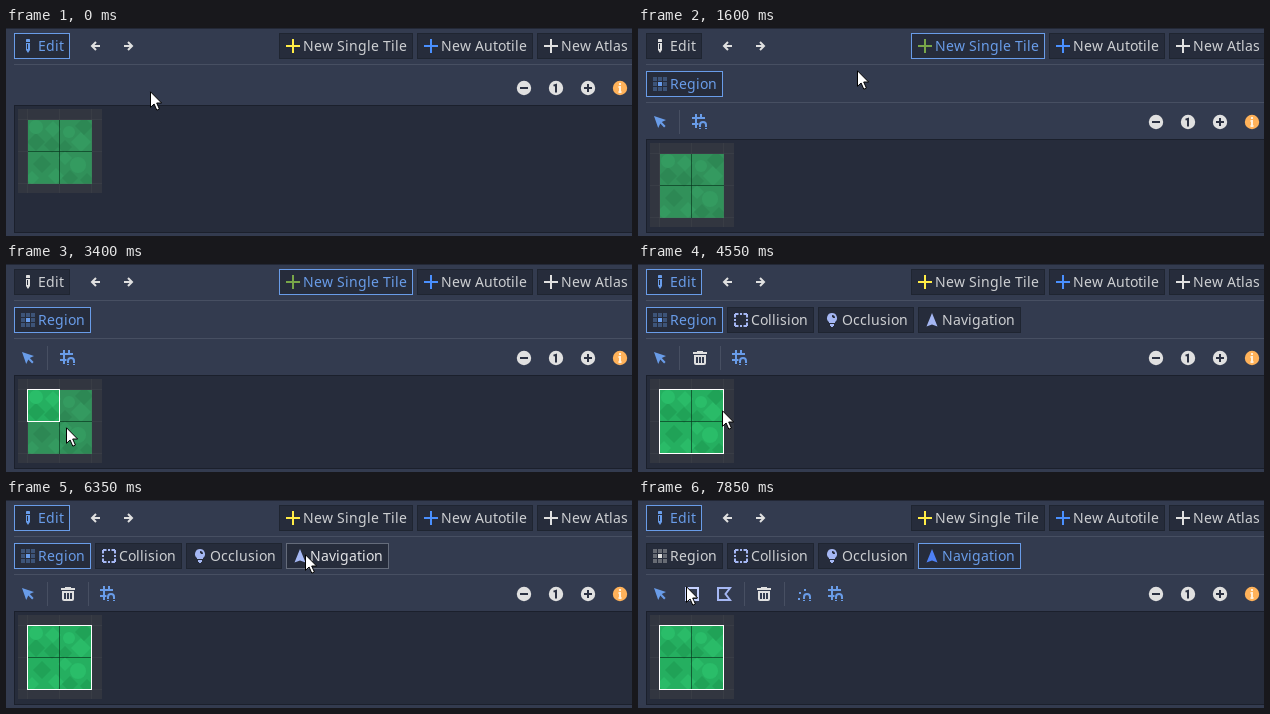
These frames come from a looping animation (626 px wide and 208 px high, 8 s). An HTML page:

```html
<!DOCTYPE html>
<html lang="en">
<head>
<meta charset="utf-8">
<title>Tile set editor</title>
<style>
  html, body { margin: 0; width: 100%; height: 100%; overflow: hidden; background: #333b4f; }
  svg { display: block; width: 626px; height: 208px; }
  text { font: 14px "Noto Sans", sans-serif; fill: #cdcfd2; white-space: pre; }
  .button .box { fill: #262c3b; stroke: #1f2531; }
  .button .icon { fill: var(--tint); stroke: var(--tint); }
  .button.hover .box { stroke: #656c7b; }
  .button.hover text { fill: #e2e3e6; }
  .button.pressed .box { stroke: #699ce8; }
  .button.pressed text { fill: #699ce8; }
  .button.pressed .icon { fill: var(--lit); stroke: var(--lit); }
  .solid { stroke: none; }
  .line { fill: none; stroke-width: 2; }
  .separator { stroke: #474f62; }
  .light { fill: #e0e0e0; }
  .blue { fill: #699ce8; }
</style>
</head>
<body>
<svg id="stage" viewBox="0 0 626 208"></svg>
<script>
const LOOP = 8000, STEP = 50;
const WHITE = '#e0e0e0', ACCENT = '#699deb', LILAC = '#a5b7f3', LILAC_LIT = '#4e80f5';

const solid = (d, extra = '') => `<path class="solid" fill-rule="evenodd" d="${d}" ${extra}/>`;
const line = (d, extra = '') => `<path class="line" d="${d}" ${extra}/>`;
const at = (x, y, body, attrs = '') => `<g transform="translate(${x} ${y})" ${attrs}>${body}</g>`;

const cells = [0, 1, 2, 3, 4, 5, 6, 7, 8].map(i =>
  `<rect class="solid" x="${1 + i % 3 * 5}" y="${1 + Math.floor(i / 3) * 5}" width="4" height="4" opacity="${i === 4 ? 1 : .35}"/>`).join('');
const magnet = solid('M11 7a4 4 0 0 0-4 4v2h2v-2a2 2 0 0 1 4 0v2h2v-2a4 4 0 0 0-4-4z')
  + solid('M7 14h2v1h-2zM13 14h2v1h-2z');

// Icons on a 16 px square
const icons = {
  pencil: solid('M7 1c-.6 0-1 .4-1 1v2h4V2c0-.6-.4-1-1-1zM6 5v7l2 3 2-3V5zM7 6h1v5H7z'),
  plus: solid('M7 1v6H1v2h6v6h2V9h6V7H9V1z'),
  region: cells,
  collision: line('M2 2H14V14H2z', 'stroke-dasharray="3.5 1.5 2 1.5 3.5 0"'),
  occlusion: solid('M8 1a5 5 0 0 0-3 9v1h6v-1a5 5 0 0 0-3-9zM8 3a3 3 0 0 1 3 3h-2a1 1 0 0 0-1-1zM6 12h4v2H9v1H7v-1H6z'),
  navigation: solid('M8 1L2.5 14.5 8 12.5l5.5 2z'),
  select: solid('M1 2l4.2 12 2.1-4.4 3.8 3.8 1.5-1.5-3.8-3.8L13 6z'),
  trash: solid('M5 1v1H1v2h14V2h-4V1zM2 5v8a2 2 0 0 0 2 2h8a2 2 0 0 0 2-2V5zM4 7h2v6H4zM7 7h2v6H7zM10 7h2v6h-2z'),
  grid: solid('M3 0v3H0v2h3v4H0v2h3v3h2V5h8V3h-3V0H8v3H5V0zM5 9h1.5v2H5z') + magnet,
  dots: solid('M2 12h2v2H2zM3 6h2v2H3zM8 3h2v2H8z') + magnet,
  rectangle: line('M2 2H14V14H2z'),
  polygon: line('M2 2H14L9.5 8 14 14H2z')
};

// Integer glyph advances, as in hinted UI text
const pen = document.createElement('canvas').getContext('2d');
pen.font = '14px "Noto Sans", sans-serif';
const advances = text => [...text].map(c => Math.round(pen.measureText(c).width));
function label(x, y, text) {
  let cursor = x;
  const xs = advances(text).map(w => (cursor += w) - w);
  return `<text x="${xs.join(' ')}" y="${y}">${text}</text>`;
}

const areas = {};
function button(id, x, y, text, icon, tint, lit) {
  const width = advances(text).reduce((a, b) => a + b) + 30;
  areas[id] = { x, y, width, height: 26 };
  return `<g id="${id}" class="button" style="--tint:${tint};--lit:${lit}">
    <rect class="box" x="${x + .5}" y="${y + .5}" width="${width - 1}" height="25"/>
    ${at(x + 6, y + 5, icons[icon], 'class="icon"')}${label(x + 24, y + 18, text)}</g>`;
}
function row(x, y, specs) {
  return specs.map(([id, ...rest]) => {
    const markup = button(id, x, y, ...rest);
    x += areas[id].width + 4;
    return markup;
  }).join('');
}

const tool = (center, icon, cls, attrs = '') => at(center - 8, 52, icons[icon], `class="${cls}" ${attrs}`);
const divider = x => `<path class="separator" d="M${x}.5 48V72"/>`;
const hline = y => `<path class="separator" d="M8 ${y}.5H626"/>`;

const disc = (x, body, color = WHITE) =>
  at(x, 60, `<circle r="7.2" fill="${color}"/><path fill="none" stroke-width="2" ${body}/>`);
const zoom = disc(518, 'stroke="#2b3142" d="M-4 0H4"')
  + disc(550, 'stroke="#2b3142" d="M-2.5 -2.4L0 -3.2V4.5"')
  + disc(582, 'stroke="#2b3142" d="M-4 0H4M0 -4V4"')
  + disc(614, 'stroke="#fff0dc" d="M0 -5V-3M-1.5 -1H0V4M-1.5 4H1.5"', '#ffb25a');

const diamond = (x, y, r, fill) => `<path fill="${fill}" d="M${x} ${y - r}l${r} ${r}-${r} ${r}-${r}-${r}z"/>`;
const blob = (x, y, r) => `<circle cx="${x}" cy="${y}" r="${r}" fill="#2abd69"/>`;
const leaf = '#2abb68', shade = '#20a257';
const tiles = `<svg x="22" y="92" width="64" height="64">
  <rect width="64" height="64" fill="#25af60"/>
  ${diamond(8, 22, 9, shade)}${diamond(25, 9, 8, leaf)}${diamond(24, 25, 8, shade)}${blob(8, 7, 7)}
  ${diamond(53, 22, 10, leaf)}${diamond(56, 6, 9, shade)}${diamond(37, 27, 7, shade)}${blob(41, 12, 6)}
  ${diamond(14, 44, 9, shade)}${diamond(28, 56, 8, leaf)}${diamond(4, 58, 7, leaf)}
  ${diamond(37, 38, 7, leaf)}${diamond(42, 58, 8, shade)}${diamond(59, 60, 7, shade)}${blob(50, 45, 8)}
</svg>`;

document.getElementById('stage').innerHTML = `
  <rect width="626" height="208" fill="#333b4f"/>
  <rect width="626" height="1" fill="#232836"/>
  ${row(8, 5, [['edit', 'Edit', 'pencil', WHITE, ACCENT]])}
  <g fill="none" stroke="${WHITE}" stroke-width="2">
    <path d="M94 18H86M90 14l-4 4 4 4"/><path d="M118 18h8M122 14l4 4-4 4"/>
  </g>
  ${row(273, 5, [
    ['single', 'New Single Tile', 'plus', '#ffec46', '#78a649'],
    ['autotile', 'New Autotile', 'plus', '#4a90ff', '#4a90ff'],
    ['atlas', 'New Atlas', 'plus', WHITE, ACCENT]])}
  ${hline(36)}
  <g id="tabs">
    ${row(8, 43, [['region', 'Region', 'region', WHITE, ACCENT]])}
    <g id="shapeTabs">${row(areas.region.x + areas.region.width + 4, 43, [
      ['collision', 'Collision', 'collision', LILAC, LILAC_LIT],
      ['occlusion', 'Occlusion', 'occlusion', LILAC, LILAC_LIT],
      ['navigation', 'Navigation', 'navigation', LILAC, LILAC_LIT]])}</g>
    ${hline(74)}
  </g>
  <rect id="panel" x="8.5" width="630" fill="#262c3b" stroke="#1b202c"/>
  <g id="lower">
    ${zoom}
    <g id="tools">
      ${tool(23, 'select', 'blue', 'id="select"')}
      <g id="drawTools">${divider(41)}${tool(62, 'grid', 'blue')}</g>
      <g id="regionTools">${divider(41)}${tool(62, 'trash', 'light')}${divider(82)}${tool(102, 'grid', 'blue')}</g>
      <g id="shapeTools">
        ${tool(54, 'rectangle', '', `id="rectangle" stroke="${LILAC}"`)}
        ${tool(86, 'polygon', '', `stroke="${LILAC}"`)}
        ${divider(106)}${tool(126, 'trash', 'light')}${divider(146)}
        ${tool(166, 'dots', 'blue')}${tool(198, 'grid', 'blue')}
      </g>
    </g>
    ${tiles}
    <path id="dim" fill="#4c4c4c" fill-opacity=".3" fill-rule="evenodd"/>
    <path stroke="#59605f" stroke-opacity=".18" d="M21.5 81V165M53.5 81V92M53.5 156V165M85.5 81V165M12 91.5H96M12 123.5H22M86 123.5H96M12 155.5H96"/>
    <path stroke="#06331c" stroke-opacity=".65" d="M53.5 92V156M22 123.5H86"/>
    <rect id="selection" x="21.5" y="91.5" fill="none" stroke="#fff"/>
  </g>
  <path id="pointer" fill="#fff" stroke="#000" d="M.5 .8V16.3L4.1 13 6.8 19.2 9.4 18 6.7 12H11.6z"/>`;

// time, x, y, eased
const path = [
  [250, 144, 63], [800, 289, 19, 1],
  [1300, 289, 19], [2150, 45, 100, 1], [2300, 28, 97], [2400, 20, 93],
  [2600, 20, 93], [2950, 26, 126, 1],
  [3200, 26, 126], [3400, 60, 163], [3600, 74, 175],
  [4250, 74, 175], [4400, 67, 163], [4550, 84, 146],
  [4700, 84, 146], [4750, 85, 144],
  [4900, 85, 144], [5750, 118, 52, 1],
  [5950, 118, 52], [6350, 299, 54, 1],
  [6900, 299, 54], [7350, 47, 132, 1],
  [7450, 47, 132], [7600, 30, 102], [7700, 35, 94],
  [7800, 35, 94], [7850, 48, 86]
];
function pointerAt(t) {
  const next = path.findIndex(p => p[0] > t);
  if (next <= 0) return (next ? path[path.length - 1] : path[0]).slice(1, 3);
  const [t0, x0, y0] = path[next - 1], [t1, x1, y1, eased] = path[next];
  let k = (t - t0) / (t1 - t0);
  if (eased) k = k * k * (3 - 2 * k);
  return [Math.round(x0 + (x1 - x0) * k), Math.round(y0 + (y1 - y0) * k)];
}

const el = id => document.getElementById(id);
const show = (id, on) => { el(id).style.display = on ? '' : 'none'; };
const set = (id, attrs) => { for (const name in attrs) el(id).setAttribute(name, attrs[name]); };

function render(t) {
  const [x, y] = pointerAt(t);
  const tabs = t >= 1100, selected = t >= 3850, shapes = t >= 6900;
  const pressed = {
    edit: t < 1100 || selected,
    single: t >= 1050 && !selected,
    region: !shapes,
    navigation: t >= 6850
  };
  for (const id in areas) {
    const a = areas[id];
    const over = x >= a.x && x < a.x + a.width && y >= a.y && y < a.y + a.height;
    el(id).classList.toggle('pressed', !!pressed[id]);
    el(id).classList.toggle('hover', over && !pressed[id]);
  }
  show('tabs', tabs);
  show('tools', tabs);
  show('shapeTabs', selected);
  show('drawTools', !selected);
  show('regionTools', selected && !shapes);
  show('shapeTools', shapes);
  set('select', { class: t >= 2550 && t < 2650 ? 'light' : 'blue' });
  set('rectangle', { stroke: t >= 7850 ? '#c6d2ff' : LILAC });

  const shift = tabs ? 34 : 0;
  set('lower', { transform: `translate(0 ${shift})` });
  set('panel', { y: 77.5 + shift, height: 127 - shift });

  // The dragged region snaps to whole 32 px tiles
  const [dragX, dragY] = pointerAt(Math.min(t, 3600));
  const snap = d => t >= 3250 ? Math.max(0, Math.round(d / 32)) * 32 : 0;
  const width = snap(dragX - 22), height = snap(dragY - 126);
  show('selection', width && height);
  set('selection', { width, height });
  set('dim', { d: `M12 81h84v84h-84zM22 92h${width}v${height}h-${width}z` });
  set('pointer', { transform: `translate(${x} ${y})` });
}

function frame(now) {
  render(Math.floor(now % LOOP / STEP) * STEP);
  requestAnimationFrame(frame);
}
render(0);
requestAnimationFrame(frame);
</script>
</body>
</html>
```
